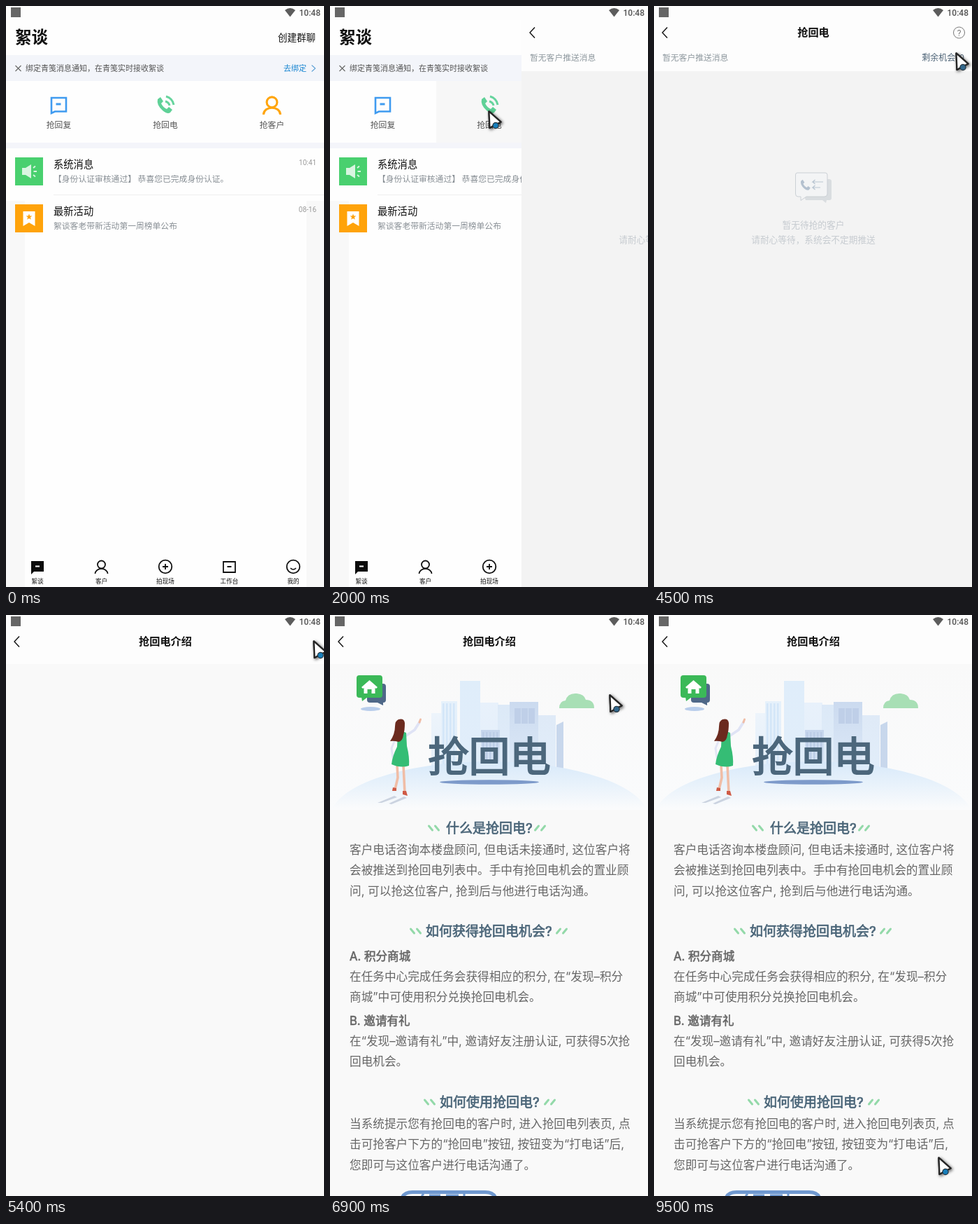
An HTML page with a canvas for the animation above (9.6 s loop, 455x829 px).

```html
<!DOCTYPE html>
<html lang="zh-CN">
<head>
<meta charset="utf-8">
<title>抢回电</title>
<style>
html, body { margin: 0; width: 100%; height: 100%; overflow: hidden; background: #fdfdfd; }
canvas { display: block; width: 455px; height: 829px; }
</style>
</head>
<body>
<canvas id="stage"></canvas>
<script>
const W = 455, H = 829, LOOP = 9600, STEP = 100;
const canvas = document.getElementById('stage');
const c = canvas.getContext('2d');
const dpr = window.devicePixelRatio || 1;
canvas.width = W * dpr;
canvas.height = H * dpr;

const CJK = '"Noto Sans CJK SC", "Noto Sans CJK", sans-serif';
const UI = 'Roboto, ' + CJK;
const DOC = 'Inter, ' + CJK;

// ---- drawing helpers ----
function rect(x, y, w, h, fill) {
  c.fillStyle = fill;
  c.fillRect(x, y, w, h);
}
// y is the middle of the glyphs; a medium text gets a thin outline
function text(s, x, y, size, fill, { weight = 400, align = 'left', font = CJK, medium = false } = {}) {
  c.font = `${weight} ${size}px ${font}`;
  c.textAlign = align;
  c.fillStyle = c.strokeStyle = fill;
  c.fillText(s, x, y + size * 0.37);
  if (medium) {
    c.lineWidth = size * 0.035;
    c.lineJoin = 'miter';
    c.strokeText(s, x, y + size * 0.37);
  }
}
function fillPath(d, fill) {
  c.fillStyle = fill;
  c.fill(new Path2D(d));
}
function line(d, color, width = 1, cap = 'butt') {
  c.strokeStyle = color;
  c.lineWidth = width;
  c.lineCap = cap;
  c.lineJoin = cap === 'round' ? 'round' : 'miter';
  c.stroke(new Path2D(d));
}
function ellipse(x, y, rx, ry, fill) {
  c.beginPath();
  c.ellipse(x, y, rx, ry, 0, 0, Math.PI * 2);
  c.fillStyle = fill;
  c.fill();
}
function ring(x, y, r, color, width) {
  c.beginPath();
  c.arc(x, y, r, 0, Math.PI * 2);
  c.strokeStyle = color;
  c.lineWidth = width;
  c.stroke();
}
function round(x, y, w, h, r, fill) {
  c.beginPath();
  c.roundRect(x, y, w, h, r);
  c.fillStyle = fill;
  c.fill();
}
function at(x, y, draw, scale = 1) {
  c.save();
  c.translate(x, y);
  c.scale(scale, scale);
  draw();
  c.restore();
}
function fade(y0, y1, from, to) {
  const g = c.createLinearGradient(0, y0, 0, y1);
  g.addColorStop(0, from);
  g.addColorStop(1, to);
  return g;
}

// ---- shared parts ----
function statusBar() {
  rect(0, 0, W, 20, '#fdfdfd');
  rect(7, 2, 14, 14, '#666');
  fillPath('M399 6 Q406.500 0 414 6 L406.500 15.500Z', '#5c5c5c');
  text('10:48', 450, 10, 12, '#555', { weight: 500, align: 'right', font: UI });
}
function header(title) {
  rect(0, 18, W, 52, '#fdfdfd');
  line('M19 30.500 L12 38 L19 45.500', '#111', 1.4);
  text(title, 228, 37.500, 15.200, '#111', { weight: 700, align: 'center' });
}
const person = (x, y, color, w, s) => at(x, y, () => {
  ring(0, -3.500, 5.500, color, w);
  line('M-9 9.500 C-8 0 8 0 9 9.500', color, w);
}, s);
const handset = 'M-9 -8 L-5 -11 L-1 -5 L-4 -2 Q-1 4 4 6 L7 3 L12 7 L9 11 Q5 14 -2 8 Q-11 0 -9 -8Z';

// ---- chat list ----
function row(y, color, title, sub, time) {
  rect(13, y, 40, 40, color);
  text(title, 68, y + 9.500, 14.300, '#111');
  text(sub, 68, y + 31, 11.800, '#888f95');
  text(time, 444, y + 7.500, 10, '#999', { align: 'right', font: UI });
}
function tabs() {
  const names = ['絮谈', '客户', '拍现场', '工作台', '我的'];
  names.forEach((s, i) => text(s, 45 + i * 91.500, 821, 8.600, '#111', { align: 'center' }));
  fillPath('M36 792 H54 V807 H40 L36 811Z', '#0b0b0b');
  rect(42, 798.500, 6, 2, '#fff');
  person(136.500, 800.500, '#111', 1.8, 1);
  ring(228, 800, 9.300, '#111', 1.8);
  line('M224 800 H232 M228 796 V804', '#111', 1.8);
  line('M311 793 H328 V808 H311Z', '#111', 1.8);
  rect(316.500, 799, 6, 2, '#111');
  ring(411, 800, 9.300, '#111', 1.8);
  line('M407 802 Q411 806 415 802', '#111', 1.6);
}
function chatList(pressed) {
  rect(0, 0, W, H, '#fefefe');
  rect(0, 278, 27, H - 278, '#f8f8f8');
  rect(430, 278, 25, H - 278, '#f8f8f8');
  text('絮谈', 13, 44.500, 23.500, '#111', { weight: 700 });
  text('创建群聊', 443, 45, 13.500, '#111', { align: 'right' });

  rect(0, 70, W, 37, '#f3f5fa');
  line('M13.500 85 L21.500 93 M21.500 85 L13.500 93', '#666', 1.1);
  text('绑定青笺消息通知，在青笺实时接收絮谈', 28, 89, 11, '#555');
  text('去绑定', 430, 89, 11, '#1b87d2', { align: 'right' });
  line('M437.500 84.500 L442.500 89 L437.500 93.500', '#5a9fd4', 1.1);

  if (pressed) rect(152, 107, 152, 88, '#f7f7f7');
  line('M65 131 H86 V150.500 H70 L65 153Z', '#3f9bf0', 2.6);
  rect(71.500, 138.500, 7, 3, '#3f9bf0');
  at(226, 141, () => {
    fillPath(handset, '#5fd197');
    line('M2 -5 A8 8 0 0 1 8 1 M3 -12 A15 15 0 0 1 14 0', '#66d49d', 3);
  });
  person(380.500, 142, '#ffa50d', 2.3, 1.35);
  ['抢回复', '抢回电', '抢客户'].forEach((s, i) =>
    text(s, 75.500 + i * 152.500, 170, 11.800, '#555', { align: 'center' }));
  rect(0, 195, W, 8, '#f4f5fa');

  row(216, '#49d06f', '系统消息', '【身份认证审核通过】 恭喜您已完成身份认证。', '10:41');
  fillPath('M23 231 H28 L36 226 V246 L28 241 H23Z', '#d9f5e1');
  line('M39 231 L42 228.500 M39.500 236 H44 M39 241 L42 243.500', '#d9f5e1', 1.8);
  rect(68, 269, 387, 1, '#efefef');
  row(283, '#ffa30a', '最新活动', '絮谈客老带新活动第一周榜单公布', '08-16');
  fillPath('M24.500 293 H41.500 V314 L33 309 L24.500 314Z', '#fff');
  at(33, 301, () => {
    c.beginPath();
    for (let i = 0; i < 10; i++) {
      const r = i % 2 ? 2 : 4.6, a = i * Math.PI / 5 - Math.PI / 2;
      c.lineTo(r * Math.cos(a), r * Math.sin(a));
    }
    c.fillStyle = '#ffa30a';
    c.fill();
  });
  tabs();
}

// ---- call list ----
function callList() {
  rect(0, 18, W, H, '#f3f3f3');
  rect(0, 18, W, 75, '#fdfdfd');
  header('抢回电');
  ring(436.500, 38, 8, '#777', 1);
  text('?', 436.500, 38.500, 12, '#777', { align: 'center', font: UI });
  text('暂无客户推送消息', 12, 74, 11.800, '#8f999f');
  text('剩余机会: 0', 444, 74, 12, '#4d6376', { align: 'right' });

  const bubble = 'M205 238 H245 Q248 238 248 241 V268 Q248 272 244 272 H218 L210 277.500 V272 H206 Q202.500 272 202.500 268 V241 Q202.500 238 205 238Z';
  fillPath('M206 247 H250 Q254 247 254 250 V274 Q254 277 251 277 H247 L246 281 L241 277 H217Z', '#d9dde0');
  fillPath(bubble, '#f3f4f5');
  line(bubble, '#cbd0d5', 1);
  at(216, 255, () => fillPath(handset, '#b4c1cf'), 0.65);
  line('M242 251 H227 L230.500 248 M227 251 L230.500 254 M238 259 H227 L230.500 256 M227 259 L230.500 262', '#b9c5d1', 1.2);
  text('暂无待抢的客户', 228, 312.500, 12.700, '#c6cbd0', { align: 'center' });
  text('请耐心等待，系统会不定期推送', 228, 333, 12.700, '#c6cbd0', { align: 'center' });
}

// ---- introduction page ----
function tower(x, y, w, fill, stripe) {
  rect(x, y, w, 242 - y, fade(y, 242, fill, '#e2eefa'));
  if (stripe) for (let i = x + 2; i < x + w - 2; i += 5) rect(i, y + 3, 2.5, 100 - (y - 123), stripe);
}
function girl() {
  fillPath('M68 268 L92 258 L96 260 L74 268Z M84 269 L106 259 L110 261 L88 270Z', '#cbd3e0');
  line('M96 214 L97 232 L93 249 M105 214 L106 234 L107 254', '#f0bda6', 3.6, 'round');
  fillPath('M90 246 L95 247 L95 251 L89 251Z M104 251 L109 251 L111 258 L104 256Z', '#cf5a45');
  line('M109 172 L121 164 L128 153', '#dfe3f5', 3.8, 'round');
  line('M128 153 L129.500 149', '#f0bda6', 3, 'round');
  line('M94 176 L88 190 L90 204', '#e3e6f5', 3, 'round');
  fillPath('M97 168 Q104 165 109 168 L110 187 Q114 203 113 215 Q101 219 88 213 Q89 202 96 188Z', '#35bd75');
  fillPath('M98 149 Q106 147 107 154 Q107 165 105 171 Q104 180 98 181 Q91 179 86 180 Q93 170 93 159 Q93 151 98 149Z', '#6b2a1e');
}
function hero() {
  rect(0, 70, W, 208, fade(70, 278, '#f9f9f9', '#fafbfc'));
  tower(145, 140, 16, '#edf4fb');
  tower(186, 94, 29, '#dfedfa');
  tower(215, 125, 26, '#e8f1fb');
  tower(240, 128, 20, '#dce9f7');
  tower(159, 123, 23, '#e6f1fb', '#d3e6f8');
  tower(298, 143, 25, '#dfeaf7');
  tower(257, 124, 41, '#cbdaef');
  for (let i = 0; i < 3; i++) rect(264 + i * 10, 133, 9, 22, '#bfcfe8');
  tower(216, 164, 27, '#c6d6ed', '#bccde7');
  fillPath('M324 157 L334 152 V242 H324Z', '#c8d7ec');
  c.save();
  c.beginPath();
  c.rect(0, 200, W, 78);
  c.clip();
  ellipse(228, 290, 228, 81, fade(212, 276, '#d9eafa', '#fafbfc'));
  c.restore();

  fillPath('M328 133 Q328 123 337 122 Q340 111 353 112 Q364 113 366 121 Q378 121 378 133Z', '#a8dfb5');
  ellipse(58, 134, 14, 3, '#b8cdeb');
  round(53, 98, 27, 27, 4, '#4f6888');
  fillPath('M66 124 H76 L76 129Z', '#4f6888');
  round(38, 86, 37, 32, 4, '#3bb958');
  fillPath('M45 117 H54 L46 123Z', '#3bb958');
  fillPath('M56.500 93 L68 103 L66 105 L64.500 104 V112 H59.500 V106 H53.500 V112 H48.500 V104 L47 105 L45 103Z', '#fff');

  ellipse(228, 238.500, 71, 3.2, '#7d9aca');
  text('抢回电', 228, 201, 58.500, '#4c677c', { align: 'center', medium: true });
  girl();
}
function heading(s, x, y, left, right) {
  text(s, x, y, 19, '#4a6578', { medium: true, font: DOC });
  const bars = (bx, dir) => [0, 9].forEach(d =>
    line(`M${bx + d - 2.5 * dir} ${y - 3} L${bx + d + 2.5 * dir} ${y + 3}`, '#93d9a9', 3, 'round'));
  bars(left, 1);
  bars(right, -1);
}
function paragraph(y, lines) {
  lines.forEach((s, i) => text(s, 28, y + i * 29.200, 16.650, '#666', { font: DOC }));
}
function intro(alphaTop, alphaBottom) {
  const bg = a => `rgba(249,249,249,${a})`;
  rect(0, 18, W, H, bg(1));
  hero();
  heading('什么是抢回电?', 166, 304, 144, 296);
  paragraph(335, [
    '客户电话咨询本楼盘顾问, 但电话未接通时, 这位客户将',
    '会被推送到抢回电列表中。手中有抢回电机会的置业顾',
    '问, 可以抢这位客户, 抢到后与他进行电话沟通。']);
  heading('如何获得抢回电机会?', 137, 451, 118, 327);
  const sub = { medium: true, font: DOC };
  text('A. 积分商城', 28, 486.500, 16.600, '#666', sub);
  paragraph(516, ['在任务中心完成任务会获得相应的积分, 在“发现–积分', '商城”中可使用积分兑换抢回电机会。']);
  text('B. 邀请有礼', 28, 579, 16.600, '#666', sub);
  paragraph(608, ['在“发现–邀请有礼”中, 邀请好友注册认证, 可获得5次抢', '回电机会。']);
  heading('如何使用抢回电?', 157, 695, 138, 310);
  paragraph(726, [
    '当系统提示您有抢回电的客户时, 进入抢回电列表页, 点',
    '击可抢客户下方的“抢回电”按钮, 按钮变为“打电话”后,',
    '您即可与这位客户进行电话沟通了。']);
  line('M103 832 Q106 823.500 118 823.500 H222 Q234 823.500 237 832', '#6f98cf', 5);
  line('M131 829 L134 826 M142 828 H158 M166 828 H184 M192 829 V826', '#6f98cf', 3);

  if (alphaTop < 1) rect(0, 70, W, 552, bg(1 - alphaTop));
  if (alphaBottom < 1) rect(0, 622, W, H - 622, bg(1 - alphaBottom));
  header('抢回电介绍');
}

// ---- pointer ----
// Straight legs: start ms, end ms, from x, y, to x, y
const legs = [
  [0, 700, 472, 260, 227, 150],
  [3100, 3700, 227, 150, 432, 84],
  [3900, 4000, 432, 84, 432, 81],
  [4400, 4500, 432, 81, 432, 67],
  [4500, 4900, 432, 67, 440, 37],
  [6800, 7500, 440, 37, 160, 575],
  [7500, 7600, 160, 575, 137, 549],
  [8800, 9500, 137, 549, 407, 774]
];
function pointer(t) {
  const [a, b, x0, y0, x1, y1] = legs.filter(l => t >= l[0]).pop();
  const k = Math.min(1, (t - a) / (b - a));
  const dull = k < 1 || (t >= 7600 && t < 8000);
  at(x0 + (x1 - x0) * k - 0.5, y0 + (y1 - y0) * k - 0.5, () => {
    const arrow = 'M1 1 L2 24.500 L8 21 L18 16Z';
    c.save();
    c.shadowColor = 'rgba(0,0,0,.8)';
    c.shadowBlur = 4 * dpr;
    c.shadowOffsetX = c.shadowOffsetY = 1.5 * dpr;
    line(arrow, '#262626', 2.5, 'round');
    c.restore();
    fillPath(arrow, '#fff');
    line(arrow, '#262626', 2.2, 'round');
    ellipse(10.500, 21, 4.700, 4.700, '#24333d');
    ellipse(10.500, 21, 3.500, 3.500, dull ? '#33688c' : '#187eba');
  });
}

// ---- timeline ----
const slide = [274, 91, 0];
const shift = (t, start) => slide[Math.min(2, (t - start) / STEP)];

function draw(t) {
  c.setTransform(dpr, 0, 0, dpr, 0, 0);
  if (t < 2200) chatList(t >= 2000);
  if (t >= 2000 && t < 5400) at(shift(t, 2000), 0, callList);
  if (t >= 5200) {
    const k = Math.max(0, Math.min(4, (t - 5400) / STEP));
    at(shift(t, 5200), 0, () => intro([0, 0.3, 0.62, 0.85, 1][k], [0, 0.2, 0.5, 0.8, 1][k]));
    if (k > 0 && k < 4) rect(454, 69, 1, 336, '#777');
  }
  statusBar();
  pointer(t);
}
const begin = performance.now();
function tick() {
  const t = (performance.now() - begin) % LOOP;
  draw(Math.floor(t / STEP) * STEP);
  requestAnimationFrame(tick);
}
tick();
</script>
</body>
</html>
```
